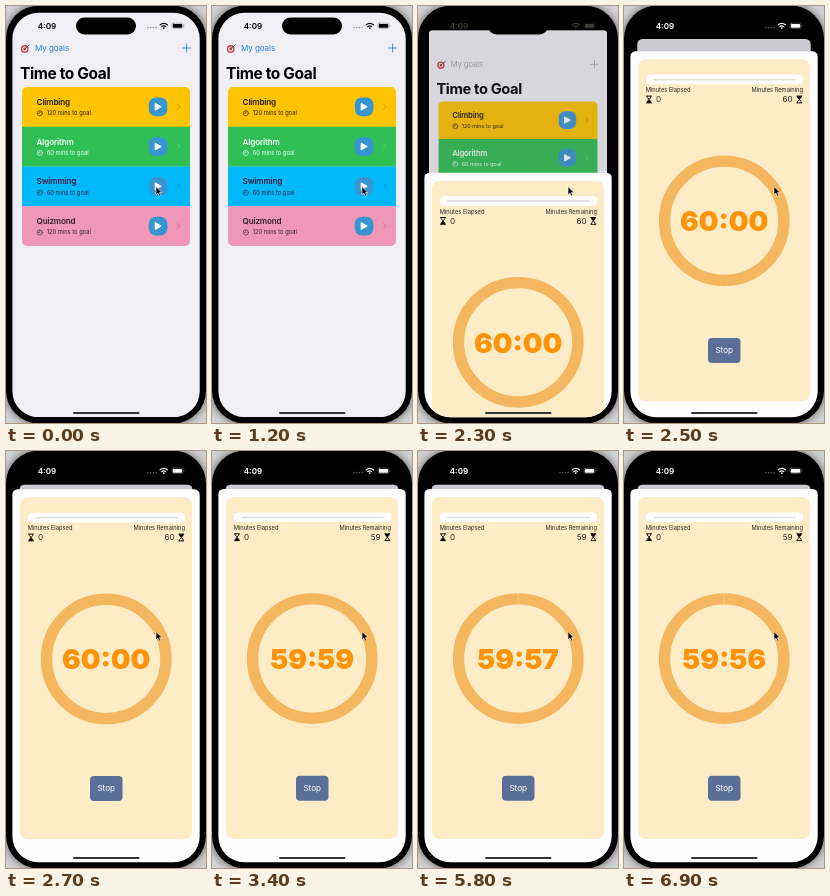
Write an HTML page that moves like this. It is 200 px wide and 417 px high and loops after 7000 ms.

```html
<!DOCTYPE html>
<html lang="en">
<head>
<meta charset="utf-8">
<title>Time to Goal</title>
<style>
html, body { margin: 0; width: 100%; height: 100%; overflow: hidden; background: #d2d2d4; }
svg { display: block; width: 100vw; height: 100vh; font: 8.1px Inter, "Liberation Sans", sans-serif; }
.body { filter: drop-shadow(0 0 4px #0009); }
.title { font-size: 15.5px; font-weight: 700; letter-spacing: -.38px; }
.name { font-weight: 600; letter-spacing: -.17px; }
.small { font-size: 5.75px; }
.clock { font-size: 27.8px; font-weight: 900; fill: #ff930a; }
.end { text-anchor: end; }
.mid { text-anchor: middle; }
.line { fill: none; stroke: currentColor; stroke-linecap: round; stroke-linejoin: round; }
</style>
</head>
<body>
<svg viewBox="0 0 200 417" preserveAspectRatio="none">
  <defs>
    <clipPath id="screen"><rect x="6.4" y="6.8" width="187.3" height="404.4" rx="26"/></clipPath>
    <clipPath id="page"><rect id="pageRect" x="6" y="6" width="188" height="405"/></clipPath>
    <clipPath id="cards"><rect x="16" y="81" width="168" height="159" rx="5"/></clipPath>
    <g id="glass">
      <path class="line" stroke-width=".9" d="M-2.4-3.4h4.8M-2.4 3.4h4.8M-1.8-3.2v1L0 0l1.8-2.2v-1M-1.8 3.2v-1L0 0l1.8 2.2v1"/>
    </g>
  </defs>

  <rect class="body" y="-.5" width="200" height="418" rx="33"/>
  <g clip-path="url(#screen)">
    <g id="back">
      <g clip-path="url(#page)">
        <rect x="6" y="6" width="188" height="405" fill="#f0eff6"/>
        <circle cx="18.7" cy="42.9" r="3.9" fill="#c4444c"/>
        <circle cx="18.7" cy="42.9" r="2.5" fill="#f0e4e6"/>
        <circle cx="18.7" cy="42.9" r="1.4" fill="#c4444c"/>
        <path d="M18.7 42.9l5-4.4" stroke="#456" fill="none"/>
        <g id="tint">
          <text x="29" y="45.2" letter-spacing="-.1" fill="currentColor">My goals</text>
          <path class="line" stroke-width=".9" d="M176.7 42h7.8M180.6 38.1v7.8"/>
        </g>
        <text class="title" x="14" y="73.4">Time to Goal</text>
        <g id="rows" clip-path="url(#cards)"></g>
        <rect id="dim" x="6" y="6" width="188" height="405" fill="#606060"/>
      </g>
    </g>

    <g id="sheet">
      <rect x="6" y="38" width="188" height="420" rx="5.5" fill="#fefdff"/>
      <rect x="14" y="46" width="172" height="342" rx="8" fill="#fdecc6"/>
      <rect x="22" y="61.5" width="157" height="9.6" rx="4" fill="#fff"/>
      <rect x="29" y="65.4" width="143" height="1.8" rx=".9" fill="#e2e1e4"/>
      <g fill="#2b2620">
        <text class="small" x="21.7" y="78.8">Minutes Elapsed</text>
        <text class="small end" x="179" y="78.8">Minutes Remaining</text>
        <text x="32" y="89">0</text>
        <text class="end" id="left" x="168.6" y="89"></text>
      </g>
      <use href="#glass" x="25" y="86.2"/>
      <path d="M23.2 89.4v-1L25 86.8l1.8 1.6v1z"/>
      <use href="#glass" x="175.3" y="86.2"/>
      <path d="M173.5 83v1l1.8 2 1.8-2v-1z"/>
      <circle cx="100.2" cy="207.6" r="59.7" fill="none" stroke="#f4b75f" stroke-width="11.4"/>
      <path id="gap" d="M100.2 142.2v11.4" stroke="#fdecc6"/>
      <text class="clock mid" id="clock" x="100.1" y="218"></text>
      <rect x="84" y="324.7" width="32.5" height="25" rx="4" fill="#5a6f98"/>
      <text class="mid" x="100.2" y="340.1" fill="#fff">Stop</text>
    </g>

    <rect x="70" y="11.5" width="60" height="17" rx="8.5"/>
    <g id="status" fill="currentColor">
      <text x="31.7" y="22.7" font-weight="600">4:09</text>
      <path class="line" opacity=".35" stroke-width="1.6" stroke-dasharray="0 2.7" d="M142 21.6h9"/>
      <path class="line" stroke-width="1.2" d="M154.2 18.8q3.6-3 7.2 0M155.8 20.6q2-1.6 4 0"/>
      <circle cx="157.8" cy="22.1" r=".9"/>
      <rect class="line" x="166" y="17.1" width="11" height="5.4" rx="1.6" stroke-width=".5" opacity=".5"/>
      <rect x="166.8" y="17.9" width="9.4" height="3.8" rx="1"/>
      <path d="M177.8 18.8q1.3 1 0 2z" opacity=".6"/>
    </g>
    <rect x="67" y="405.9" width="66.5" height="2.1" rx="1" fill="#333"/>
  </g>
  <path d="M150 180.6v8.2l1.9-1.7 1.3 3 1.5-.7-1.3-2.8h2.5z" stroke="#fff" stroke-width=".6"/>
</svg>

<script>
const LOOP = 7000, STEP = 100;
const OPEN = 2175, SPRING = .0181, TRAVEL = 379;
const FIRST_TICK = 3100;
const el = id => document.getElementById(id);

// name, minutes, card colour, text colour
const goals = [
  ['Climbing', 120, '#ffc400', '#241d08'],
  ['Algorithm', 60, '#2fbf55', '#f4fff6'],
  ['Swimming', 60, '#00b9fb', '#351f42'],
  ['Quizmond', 120, '#f096b7', '#33232b']
];
el('rows').innerHTML = goals.map(([name, mins, card, ink], i) => `
  <g transform="translate(0 ${81 + i * 39.75})" color="${ink}" fill="${ink}">
    <rect x="16" width="168" height="40" fill="${card}"/>
    <text class="name" x="30.6" y="17.8">${name}</text>
    <circle class="line" cx="33.8" cy="26.2" r="2.6" stroke-width=".6"/>
    <path class="line" stroke-width=".6" d="M33.8 24.5v1.8h-1.4"/>
    <text class="small" x="40.7" y="28.2">${mins} mins to goal</text>
    <rect x="142.8" y="10.4" width="18.6" height="18.8" rx="7" fill="#3796d2"/>
    <path d="M149.2 16.4v6.8l6-3.4z" fill="#fff" stroke="#fff" stroke-linejoin="round"/>
    <path class="line" stroke="#000" opacity=".3" stroke-width=".8" d="M171.7 17.2l2.3 2.5-2.3 2.5"/>
  </g>`).join('');

const clamp = v => Math.max(0, Math.min(1, v));
const mix = (a, b, p) => `rgb(${a.map((v, i) => v + (b[i] - v) * p)})`;

function draw(t) {
  // critically damped spring drives the sheet and the page behind it
  const s = Math.max(0, t - OPEN) * SPRING;
  const p = 1 - (1 + s) * Math.exp(-s);
  el('sheet').setAttribute('transform', `translate(0 ${TRAVEL * (1 - p)})`);
  el('back').setAttribute('transform',
    `translate(100 ${6 + 27.5 * p}) scale(${1 - .078 * p}) translate(-100 -6)`);
  el('pageRect').setAttribute('rx', 6 * p);
  el('dim').setAttribute('opacity', .26 * p);
  el('tint').style.color = mix([35, 132, 224], [165, 165, 170], clamp(p * 1.6));
  el('status').style.color = mix([0, 0, 0], [255, 255, 255], clamp((t - 2250) / 220));

  const ticks = t < FIRST_TICK ? 0 : 1 + Math.floor((t - FIRST_TICK) / 1000);
  const left = 3600 - ticks, mins = Math.floor(left / 60);
  el('clock').textContent = `${mins}:${String(left % 60).padStart(2, '0')}`;
  el('left').textContent = mins;
  el('gap').setAttribute('stroke-width', ticks * .105);
}

const start = performance.now();
function frame() {
  const t = (performance.now() - start) % LOOP;
  draw(Math.floor(t / STEP) * STEP);
  requestAnimationFrame(frame);
}
frame();
</script>
</body>
</html>
```
